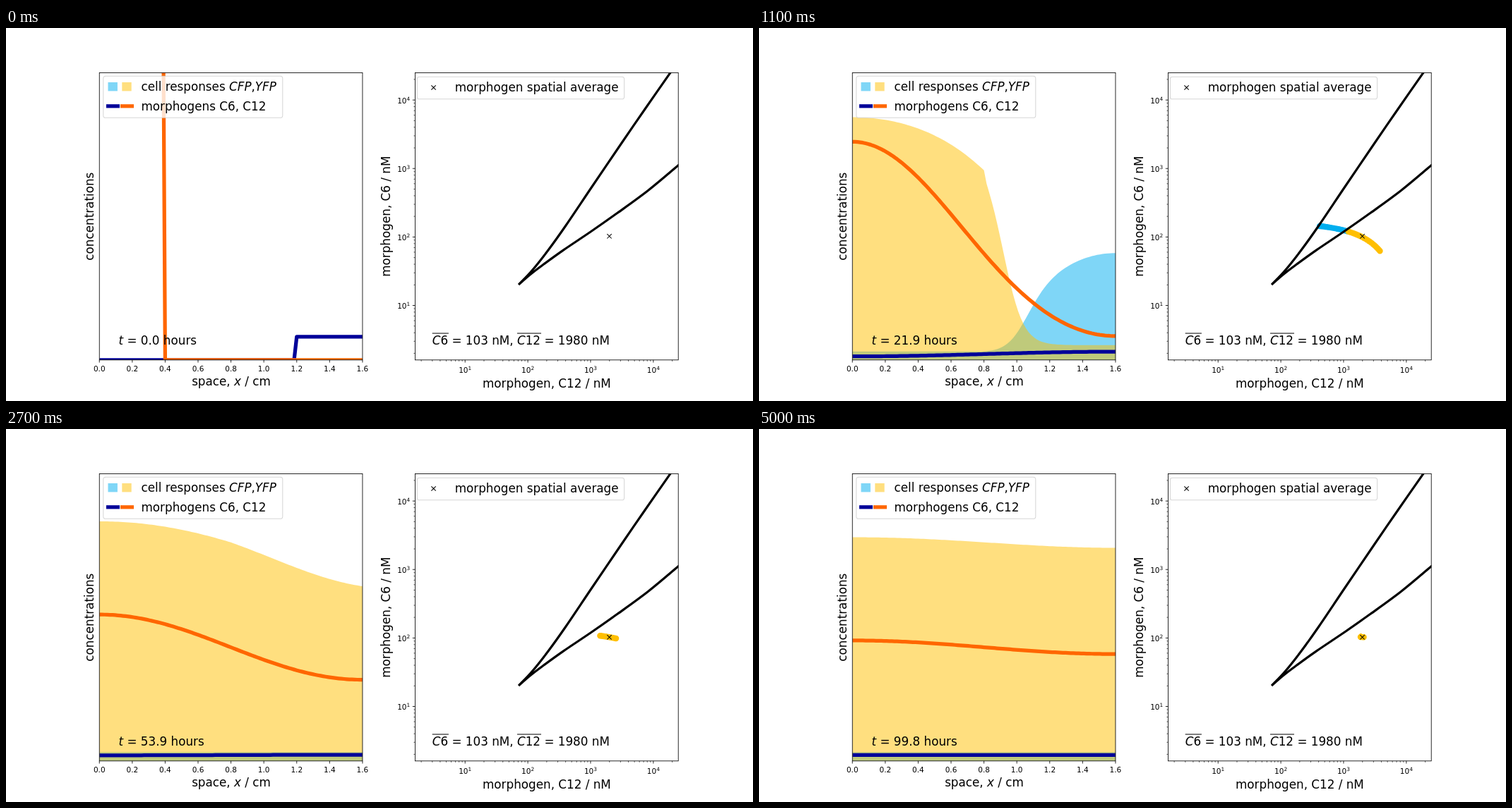
Animation of 1058 by 529 pixels, one loop 5.1 s. Source, as an HTML page:

```html
<!DOCTYPE html>
<html lang="en">
<head>
<meta charset="utf-8">
<title>Morphogen gradients</title>
<style>
html, body { margin: 0; width: 100%; height: 100%; overflow: hidden; background: #fff; }
svg { display: block; width: 1058px; height: 529px; font: 16.79px "DejaVu Sans", sans-serif; }
.tick { font-size: 10.5px; }
.mid { text-anchor: middle; }
.legend { fill: #fff; fill-opacity: .8; stroke: #ccc; stroke-opacity: .8; stroke-width: 1.05; }
.frame { fill: none; stroke: #000; stroke-width: .84; }
.line { fill: none; stroke-width: 5.25; stroke-linejoin: round; }
.dots { fill: none; stroke-width: 8.4; stroke-linecap: round; }
.it { font-style: italic; }
</style>
</head>
<body>
<svg viewBox="0 0 1058 529">
  <clipPath id="clipL"><rect x="132.25" y="63.5" width="372.7" height="407.3"/></clipPath>
  <clipPath id="clipR"><rect x="579.5" y="63.5" width="372.7" height="407.3"/></clipPath>

  <g clip-path="url(#clipL)">
    <path id="cfp" fill="#00aeef" fill-opacity=".5"/>
    <path id="yfp" fill="#ffbf00" fill-opacity=".5"/>
    <path id="c6" class="line" stroke="#000099"/>
    <path id="c12" class="line" stroke="#ff6600"/>
  </g>
  <g clip-path="url(#clipR)">
    <path id="blueDots" class="dots" stroke="#00aeef"/>
    <path id="goldDots" class="dots" stroke="#ffbf00"/>
    <path id="wedge" fill="none" stroke="#000" stroke-width="3.15" stroke-linejoin="round"/>
    <path d="M851.4 292.2l6.3 6.3m0-6.3l-6.3 6.3" stroke="#000" stroke-width="1.05"/>
  </g>
  <rect class="frame" x="132.25" y="63.5" width="372.7" height="407.3"/>
  <rect class="frame" x="579.5" y="63.5" width="372.7" height="407.3"/>
  <g id="ticks" class="tick"></g>

  <rect class="legend" x="137.8" y="68.3" width="254" height="59" rx="3.4"/>
  <path d="M144.5 77h13.4v12.4h-13.4z" fill="#00aeef" fill-opacity=".5"/>
  <path d="M164.3 77h13.4v12.4h-13.4z" fill="#ffbf00" fill-opacity=".5"/>
  <path d="M142 110.8h19" stroke="#000099" stroke-width="5.25"/>
  <path d="M162 110.8h19" stroke="#ff6600" stroke-width="5.25"/>
  <text x="191.5" y="89.3">cell responses <tspan class="it">CFP</tspan>,<tspan class="it">YFP</tspan></text>
  <text x="191.5" y="116.8">morphogens C6, C12</text>
  <text x="159.5" y="449.3"><tspan class="it">t</tspan> = <tspan id="hours">0.0</tspan> hours</text>
  <text class="mid" x="319" y="507">space, <tspan class="it">x</tspan> / cm</text>
  <text class="mid" transform="translate(124.2 267.2) rotate(-90)">concentrations</text>

  <rect class="legend" x="582.3" y="69.2" width="293.3" height="31.6" rx="3.4"/>
  <path d="M602.4 81.4l6.3 6.3m0-6.3l-6.3 6.3" stroke="#000" stroke-width="1.05"/>
  <text x="635.7" y="90">morphogen spatial average</text>
  <text x="603.7" y="449"><tspan class="it">C</tspan>6 = 103 nM, <tspan class="it">C</tspan>12 = 1980 nM</text>
  <path d="M603.7 433h23.2M724 433h34" stroke="#000" stroke-width="1"/>
  <text class="mid" x="765.9" y="510">morphogen, C12 / nM</text>
  <text class="mid" transform="translate(544.3 267.2) rotate(-90)">morphogen, C6 / nM</text>
</svg>
<script>
const LEFT = 132.25, BOTTOM = 470.81, W = 372.7, H = 407.33;
const SCALE = H / 5000, LOG_MIN = Math.log10(1.6), LOG_SPAN = Math.log10(25000 / 1.6);
const FRAMES = 51, STEP_HOURS = 1.9952, N = 100;
const $ = id => document.getElementById(id);
const lerp = (a, b, u) => a + (b - a) * u;
const pos = (x, y) => x.toFixed(2) + ' ' + y.toFixed(2);
const logX = v => 579.5 + W * (Math.log10(v) - LOG_MIN) / LOG_SPAN;
const logY = v => BOTTOM - H * (Math.log10(v) - LOG_MIN) / LOG_SPAN;

// Catmull-Rom curve through a few points
function smooth(p) {
  let d = 'M' + p[0];
  for (let i = 0; i < p.length - 1; i++) {
    const a = p[i - 1] || p[i], b = p[i], c = p[i + 1], e = p[i + 2] || c;
    d += 'C' + [0, 1].map(k => b[k] + (c[k] - a[k]) / 6) + ' ' +
         [0, 1].map(k => c[k] - (e[k] - b[k]) / 6) + ' ' + c;
  }
  return d;
}

function drawAxes() {
  let out = '', marks = '', minor = '';
  for (let i = 0; i <= 8; i++) {
    const x = LEFT + W * i / 8;
    marks += `M${x} ${BOTTOM}v3.67`;
    out += `<text class="mid" x="${x}" y="486.5">${(i * .2).toFixed(1)}</text>`;
  }
  for (let e = 0; e <= 4; e++) {
    for (let m = 1; m < 10; m++) {
      const v = m * 10 ** e;
      if (v < 1.6 || v > 25000) continue;
      const x = logX(v), y = logY(v), tick = n => `M${x} ${BOTTOM}v${n}M579.5 ${y}h${-n}`;
      if (m > 1) { minor += tick(2.1); continue; }
      marks += tick(3.67);
      const label = `10<tspan dy="-4" font-size="7.35">${e}</tspan>`;
      out += `<text class="mid" x="${x}" y="489">${label}</text>` +
             `<text text-anchor="end" x="572.2" y="${y + 4.8}">${label}</text>`;
    }
  }
  $('ticks').innerHTML = `<path d="${marks}" stroke="#000" stroke-width=".84"/>` +
    `<path d="${minor}" stroke="#000" stroke-width=".63"/>` + out;
  $('wedge').setAttribute('d',
    smooth([[943, 60.4], [905, 115], [870, 166], [830, 225], [793, 280], [768, 315], [745, 344], [726, 364]]) +
    smooth([[726, 364], [742, 350], [760, 336.2], [790, 314.6], [828, 289], [866, 262.3], [910, 230], [956, 191.5]]));
}

// Diffusion of a block filling the share f of a closed interval; u runs from 0 to 1
function diffuse(mean, f, rate, u, t) {
  if (t === 0) return u < f ? mean / f : 0;
  let sum = 1;
  for (let n = 1; n <= 24; n++) {
    const w = n * Math.PI;
    sum += 2 * Math.sin(w * f) / (w * f) * Math.exp(-rate * n * n * t) * Math.cos(w * u);
  }
  return Math.max(0, mean * sum);
}
const concC12 = (s, t) => diffuse(1980, .245, .0342, s, t);
const concC6 = (s, t) => diffuse(103, .255, .0686, 1 - s, t);

// frame, front, log slope, slope behind, slope ahead, low YFP, CFP level, CFP front, CFP width
const KEYS = [
  [0, 3, 2, 0, 0, 0, 380, 5, 5],
  [7, 11.2, 2, 0, 0, 13, 255, 17, 8],
  [11, 33, .4, .062, .062, 21, 154, 54, 15.6],
  [19, 112, .2, .035, .053, 50, 31.5, 138, 16],
  [27, 500, 1, .0045, .0045, 60, 0, 200, 16],
  [50, 5000, 1, .0045, .0045, 60, 0, 200, 16]
];
const odds = ([, front, p, behind, ahead], d) =>
  p * Math.log(d / front) + (d < front ? behind : ahead) * (d - front);

function draw(frame) {
  const t = frame * STEP_HOURS;
  const k = Math.max(1, KEYS.findIndex(key => key[0] >= frame));
  const a = KEYS[k - 1], b = KEYS[k], u = (frame - a[0]) / (b[0] - a[0]);
  const [low, level, front, width] = [5, 6, 7, 8].map(j => lerp(a[j], b[j], u));
  const growth = 1 - Math.exp(-((t / 13.13) ** 1.675));
  const base = 12.5 * Math.cbrt(growth);
  const past = t - Math.min(4, .3 * t); // YFP trails the C12 signal
  const cfp = [], yfp = [], c6 = [], c12 = [];
  let blue = '', gold = '';

  for (let i = 0; i <= N; i++) {
    const s = i / N, x = LEFT + W * s, d = W * (s - .5);
    const v12 = concC12(s, t), v6 = concC6(s, t);
    let y = growth / (.002088 + 2.25 / concC12(s, past)), c = base;
    if (d > 0) {
      y = low + (y - low) / (1 + Math.exp(lerp(odds(a, d), odds(b, d), u)));
      c += level * growth * Math.sin(d / W * Math.PI) ** .75 / (1 + Math.exp((front - d) / width));
    }
    cfp.push(pos(x, BOTTOM - c));
    yfp.push(pos(x, BOTTOM - y));
    c6.push(pos(x, BOTTOM - v6 * SCALE));
    c12.push(pos(x, BOTTOM - v12 * SCALE));
    if (v6 > .5 && v12 > .5) {
      const dot = 'M' + pos(logX(v12), logY(v6)) + 'h0';
      if (y > c) gold += dot; else blue += dot;
    }
  }
  const set = (id, d) => $(id).setAttribute('d', d);
  const line = p => 'M' + p.join('L');
  const area = p => line(p) + `V${BOTTOM}H${LEFT}Z`;
  set('cfp', area(cfp));
  set('yfp', area(yfp));
  set('c6', line(c6));
  set('c12', line(c12));
  set('blueDots', blue);
  set('goldDots', gold);
  $('hours').textContent = t.toFixed(1);
}

let shown = -1;
function tick() {
  const frame = Math.floor(performance.now() / 100) % FRAMES;
  if (frame !== shown) draw(shown = frame);
  requestAnimationFrame(tick);
}
drawAxes();
tick();
</script>
</body>
</html>
```
